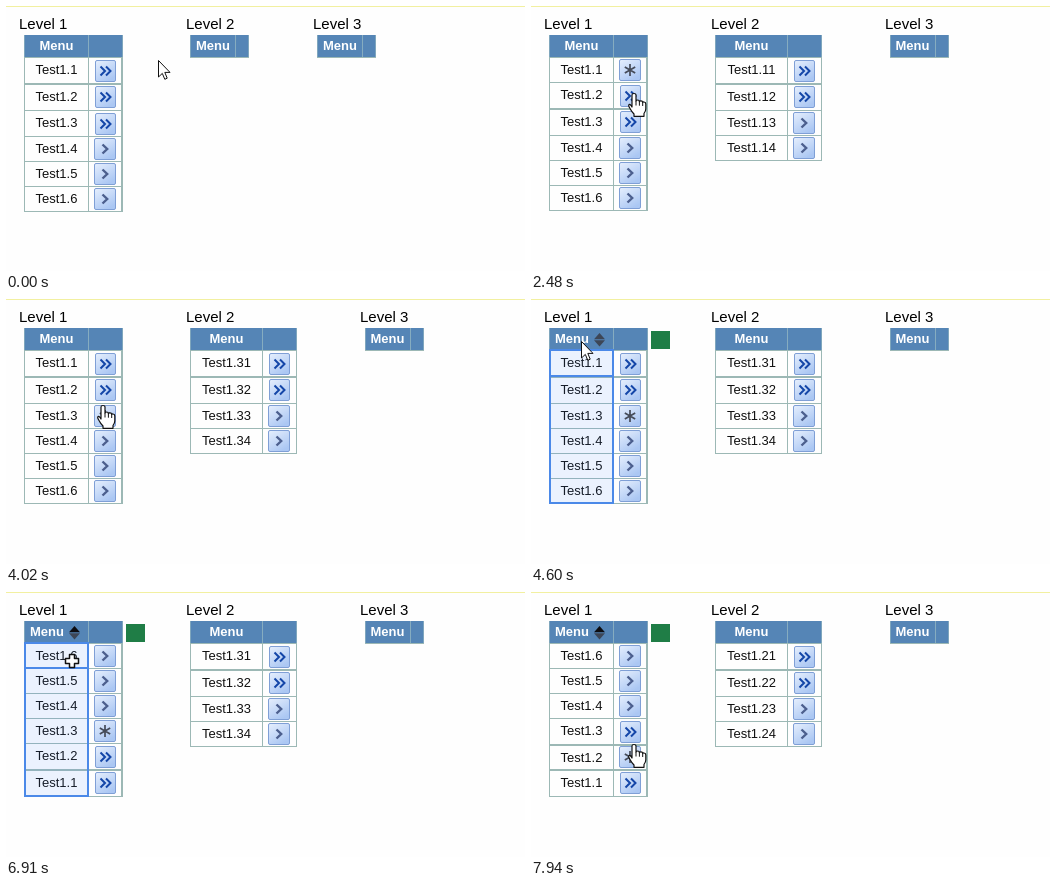
An HTML page for the animation above (8000 ms loop, 519 px wide and 265 px high).

```html
<!DOCTYPE html>
<html lang="en">
<head>
<meta charset="utf-8">
<title>Menu levels</title>
<style>
  html, body { margin: 0; width: 100%; height: 100%; overflow: hidden; background: #fefefe; }
  svg { display: block; width: 519px; height: 265px; font: 13px "Liberation Sans", Arial, sans-serif; }
  .label { font-size: 15px; }
  .head { font-weight: bold; fill: #fff; text-anchor: middle; }
  .cell { fill: #111; text-anchor: middle; }
</style>
</head>
<body>
<svg id="stage" viewBox="0 0 519 265">
  <defs>
    <linearGradient id="face" x2="0.6" y2="1">
      <stop offset="0" stop-color="#e6effd"/>
      <stop offset="1" stop-color="#abc7f3"/>
    </linearGradient>
  </defs>
  <g id="view"></g>
</svg>
<script>
const LOOP = 8000, TOP = 51, GRID = '#9cb8b5', BLUE = '#5585b6';
const view = document.getElementById('view');

// time, pointer kind, hot spot
const pointer = [
  [0, 'arrow', 152, 54], [400, 'arrow', 146, 60], [470, 'arrow', 141, 63],
  [810, 'arrow', 135, 64], [880, 'arrow', 124, 63], [940, 'plus', 114, 69],
  [1005, 'hand', 109, 61], [1070, 'hand', 107, 61],
  [2210, 'hand', 106, 66], [2300, 'hand', 104, 74], [2390, 'hand', 103, 82], [2480, 'hand', 103, 87],
  [3090, 'hand', 103, 92], [3160, 'hand', 103, 99], [3230, 'hand', 102, 104], [3380, 'hand', 102, 112],
  [4020, 'hand', 97, 106], [4090, 'plus', 84, 88], [4170, 'plus', 70, 66],
  [4260, 'arrow', 58, 48], [4350, 'arrow', 50, 42],
  [6790, 'arrow', 54, 48], [6850, 'plus', 60, 58], [6910, 'plus', 66, 69],
  [7000, 'plus', 76, 100], [7060, 'plus', 82, 122],
  [7210, 'plus', 85, 137], [7290, 'hand', 93, 155], [7370, 'hand', 98, 166], [7450, 'hand', 100, 170],
  [7820, 'hand', 101, 165], [7880, 'hand', 102, 157], [7940, 'hand', 103, 152]
];
const opened = [[0, 0], [1880, 1], [2760, 2], [3650, 3], [7530, 2]];
const clicks = [[1790, 1880], [4530, 4600], [5180, 5240], [5300, 5360], [6060, 6130]];

const shapes = {
  arrow: '<path d="M.5 .5V17L4.3 13.4L6.8 19.3L9.2 18.2L6.8 12.4H12Z"/>',
  plus: '<path stroke-width="1.5" d="M-2.5-6.5h5v4h4v5h-4v4h-5v-4h-4v-5h4z"/>',
  hand: '<path stroke-width="1.2" d="M-2 14V2Q-2 .5 0 .5Q2 .5 2 2V8Q2 7 3.7 7Q5.4 7 5.4 8.7Q5.6 7.8 7 7.8' +
    'Q8.6 7.8 8.7 9.5Q9 8.8 10.2 9Q11.8 9.2 11.8 11V16Q11.8 18 10 20.5V23.3H0V21Q-2.5 18.5-4 15.5' +
    'Q-6 12.5-5 11.6Q-3.8 10.8-2 14Z"/><path fill="none" d="M2 8v4.5M5.4 8.7v4M8.7 9.5v3.5"/>'
};

const last = (list, t) => list.filter(k => k[0] <= t).pop();
const within = (t, [a, b]) => t >= a && t < b;
const rect = (x, y, w, h, fill, extra = '') =>
  `<rect x="${x}" y="${y}" width="${w}" height="${h}" fill="${fill}" ${extra}/>`;
const text = (x, y, cls, s) => `<text x="${x}" y="${y}" class="${cls}">${s}</text>`;

function button(cx, top, kind) {
  const wide = kind === 'more';
  const y = Math.round(top + (wide ? 3 : 2));
  const x = cx - 11 + (wide ? 1 : 0), w = wide ? 21 : 22;
  const mx = x + w / 2, my = y + 11;
  const mark = {
    more: `<path d="M${mx - 5} ${my - 4.5}l4.5 4.5l-4.5 4.5m5.5-9l4.5 4.5l-4.5 4.5" stroke="#1446a8" stroke-width="2"/>`,
    next: `<path d="M${mx - 2.5} ${my - 4.5}l4.7 4.5l-4.7 4.5" stroke="#4c5f8e" stroke-width="2.4"/>`,
    open: `<path d="M${mx} ${my - 6}v12m-5.2-9l10.4 6m0-6l-10.4 6" stroke="#454b58" stroke-width="1.7"/>`
  }[kind];
  return rect(x + .5, y + .5, w - 1, 21, 'url(#face)', 'stroke="#7f9fd6" rx="1.5"') + `<g fill="none">${mark}</g>`;
}

function header(x, w, split, menuX) {
  return rect(x, 29, w, 23, BLUE) +
    rect(x, 29, 1, 23, '#7fa6bd') + rect(split, 29, 1, 23, '#86acc0') +
    rect(x + w - 1, 29, 1, 23, '#7fa6bd') + rect(x, TOP, w, 1, GRID) +
    text(menuX, 44, 'head', 'Menu');
}

// rows: [text, kind]; returns markup and row edges
function table(x, w, split, btnX, rows, menuX) {
  const mid = (x + split + 1) / 2;
  let y = TOP, out = '';
  const edges = [y];
  for (const [label, kind] of rows) {
    out += text(mid, Math.round(y + 17.2), 'cell', label) + button(btnX, y, kind);
    y += kind === 'more' ? 26.4 : 25;
    const thick = Math.abs(y % 1 - .5) < .15 ? 2 : 1;
    out += rect(x, thick > 1 ? Math.floor(y) : Math.round(y), w, thick, GRID);
    edges.push(y);
  }
  const h = Math.round(y) - TOP + 1;
  out += [x, split, x + w - 1].map(v => rect(v, TOP, 1, h, GRID)).join('');
  return { out: out + header(x, w, split, menuX || mid), edges };
}

function selection(edges) {
  const frame = b => rect(19, TOP, 63, Math.round(b) - TOP, 'none', 'stroke="#4b89e8" stroke-width="2"');
  const end = edges[edges.length - 1];
  return rect(19, TOP, 63, end - TOP, '#4b89ff', 'opacity=".1"') + frame(edges[1]) + frame(end);
}

function sortIcon(up, down) {
  return `<path d="M63 40.3L68.5 34L74 40.3Z" fill="${up}"/><path d="M63 41.3H74L68.5 47.5Z" fill="${down}"/>`;
}

function draw(t) {
  const open = last(opened, t)[1];
  const marked = t >= 4600, flipped = t >= 6130;
  const order = [1, 2, 3, 4, 5, 6];
  if (flipped) order.reverse();

  let out = rect(0, 0, 519, 1, '#f2f0a0') +
    text(13, 23, 'label', 'Level 1') + text(180, 23, 'label', 'Level 2') +
    text(open ? 354 : 307, 23, 'label', 'Level 3');

  const first = table(18, 99, 82, 99,
    order.map(n => ['Test1.' + n, n === open ? 'open' : n < 4 ? 'more' : 'next']), marked ? 41 : 50.5);
  const end = Math.round(first.edges[6]);
  out += first.out + rect(115, TOP, 1, end - TOP, GRID);

  if (open) {
    out += table(184, 107, 256, 273,
      [1, 2, 3, 4].map(n => [`Test1.${open}${n}`, n < 3 ? 'more' : 'next'])).out;
    out += header(359, 59, 404, 381.5);
  } else {
    out += header(184, 59, 229, 207) + header(311, 59, 356, 334);
  }

  if (marked) {
    const dim = '#3d4656', on = '#0c0c10';
    out += sortIcon(flipped ? on : dim, flipped || t < 5300 ? dim : on);
    if (t < 7530) out += selection(first.edges);
  }
  if (t >= 4260) out += rect(120, 32, 19, 18, '#1f7d46');

  const [, kind, x, y] = last(pointer, t);
  if (clicks.some(c => within(t, c)))
    out += `<circle cx="${x}" cy="${y + 1}" r="10" fill="#fff" fill-opacity=".25" stroke="#222"/>`;
  return out + `<g transform="translate(${x} ${y})" fill="#fff" stroke="#111" stroke-linejoin="round">${shapes[kind]}</g>`;
}

let shown = '';
function tick() {
  const next = draw(performance.now() % LOOP);
  if (next !== shown) view.innerHTML = shown = next;
  requestAnimationFrame(tick);
}
tick();
</script>
</body>
</html>
```
